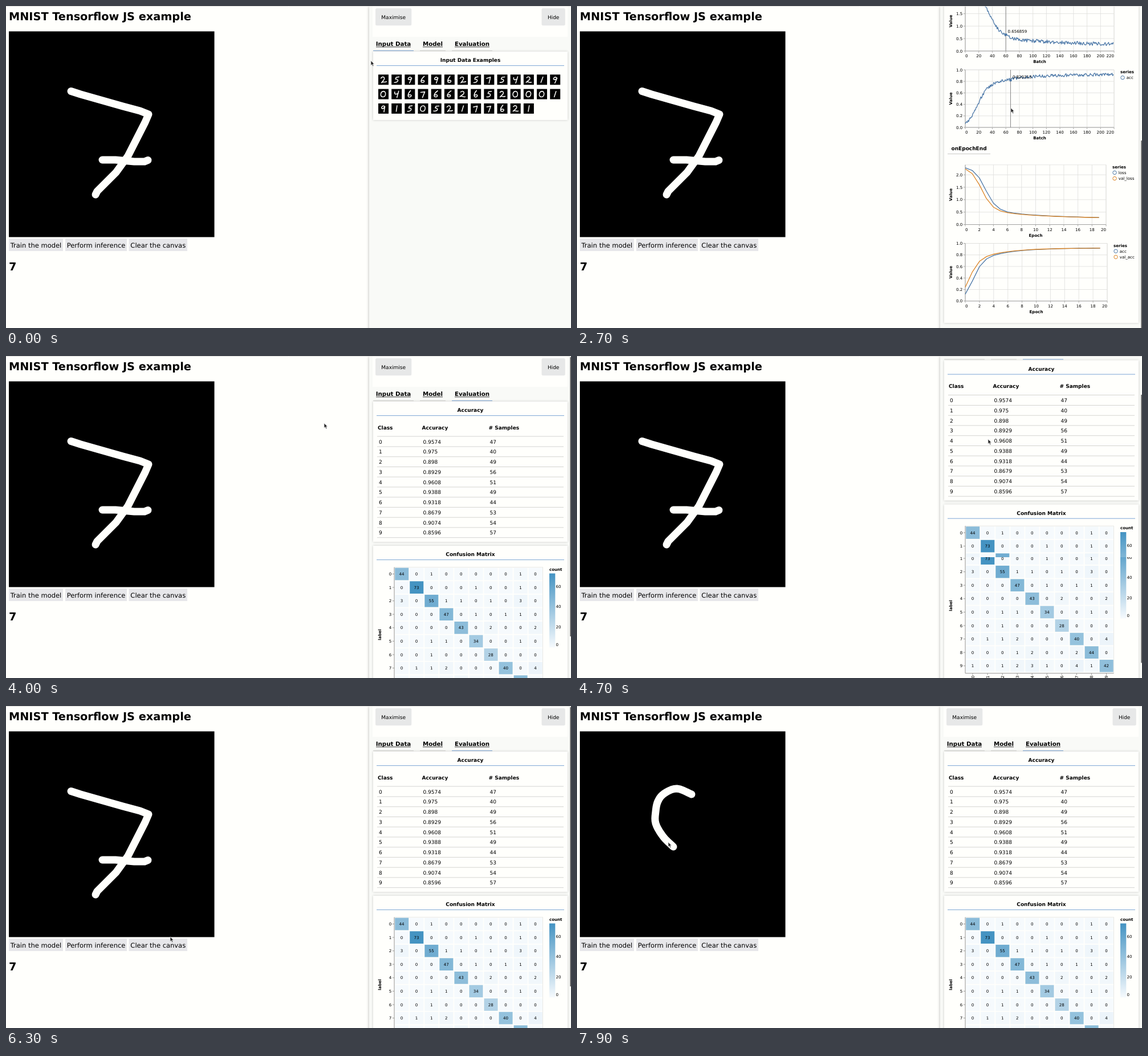
An HTML page with a canvas that plays this animation: 991 px wide and 565 px high, repeating every 8000 ms.

```html
<!DOCTYPE html>
<html lang="en">
<head>
<meta charset="utf-8">
<title>MNIST Tensorflow JS example</title>
<style>
html, body { margin: 0; width: 100%; height: 100%; overflow: hidden; background: #fffffc; }
canvas { display: block; }
</style>
</head>
<body>
<canvas id="stage" width="991" height="565"></canvas>
<script>
const ctx = document.getElementById('stage').getContext('2d');
const LOOP = 8000, STEP = 100;
const SANS = '"DejaVu Sans", sans-serif';
const PAPER = '#fffffc', INK = '#000', RULE = '#c9c9c7', GRID = '#dededc', AXIS = '#888';
const ACCENT = '#5b8fcb', LINK = '#4080c4', BLUE = '#4c78a8', ORANGE = '#dc8526';
const HEAD = 19.3, BUTTON = 11.5, TAB = 10.28, BODY = 9, SMALL = 7.07;

// ---- drawing helpers; text is placed by the middle of its capitals ----
function text(str, x, y, { size = BODY, bold = false, align = 'left', color = INK, turn = 0 } = {}) {
  ctx.save();
  ctx.translate(x, y);
  ctx.rotate(turn);
  ctx.font = `${bold ? 'bold ' : ''}${size}px ${SANS}`;
  ctx.textRendering = 'geometricPrecision';
  ctx.textAlign = align;
  ctx.fillStyle = color;
  ctx.fillText(str, 0, size * 0.365);
  ctx.restore();
}
const bold = (str, x, y, opts) => text(str, x, y, { bold: true, ...opts });
const small = (str, x, y, opts) => text(str, x, y, { size: SMALL, ...opts });
const axisTitle = (str, x, y, turn = 0) => small(str, x, y, { bold: true, align: 'center', turn });
const UP = -Math.PI / 2;

function rect(x, y, w, h, color) {
  ctx.fillStyle = color;
  ctx.fillRect(x, y, w, h);
}
function frame(x, y, w, h) {
  ctx.strokeStyle = GRID;
  ctx.lineWidth = 0.7;
  ctx.strokeRect(x, y, w, h);
}
function rounded(x, y, w, h, color) {
  ctx.beginPath();
  ctx.roundRect(x, y, w, h, 2.5);
  ctx.fillStyle = color;
  ctx.fill();
}
function disc(x, y, r) {
  ctx.beginPath();
  ctx.arc(x, y, r, 0, 2 * Math.PI);
}
function line(points, color, width = 1, ends = 'butt') {
  ctx.beginPath();
  points.forEach(([x, y]) => ctx.lineTo(x, y));
  ctx.strokeStyle = color;
  ctx.lineWidth = width;
  ctx.lineCap = ends;
  ctx.lineJoin = 'round';
  ctx.stroke();
}
const hline = (x1, x2, y, color = RULE, w = 0.8) => line([[x1, y], [x2, y]], color, w);
const vline = (x, y1, y2, color = RULE, w = 0.8) => line([[x, y1], [x, y2]], color, w);

function card(top, bottom, title) {
  ctx.save();
  ctx.shadowColor = 'rgba(0,0,0,.2)';
  ctx.shadowBlur = 4;
  rect(644, top, 341, bottom - top, PAPER);
  ctx.restore();
  bold(title, 814.5, top + 15, { align: 'center' });
  hline(650, 979, top + 24.6, ACCENT);
}

// ---- motion ----
const mix = (a, b, k) => a + (b - a) * k;
const sigmoid = v => 1 / (1 + Math.exp(-v));
const noise = n => { const v = Math.sin(n * 127.1 + 3.7) * 43758.5453; return (v - Math.floor(v)) * 2 - 1; };

function at(keys, t) {
  const n = keys.findIndex(k => k[0] > t);
  if (n < 0) return keys[keys.length - 1].slice(1);
  const a = keys[n - 1], b = keys[n], k = (t - a[0]) / (b[0] - a[0]);
  return a.slice(1).map((v, i) => mix(v, b[i + 1], k));
}
// smooth curve through the points, u counts points
function spline(points, u) {
  const i = Math.floor(u), k = u - i;
  const [a, b, c, d] = [-1, 0, 1, 2].map(o => points[Math.min(points.length - 1, Math.max(0, i + o))]);
  return [0, 1].map(j => b[j] + k / 2 * (c[j] - a[j]
    + k * (2 * a[j] - 5 * b[j] + 4 * c[j] - d[j] + k * (3 * (b[j] - c[j]) + d[j] - a[j]))));
}

const POINTER = [
  [0, 640, 96], [300, 640, 75], [400, 639, 95], [600, 638, 95], [1100, 757, 61], [1700, 757, 61],
  [2000, 752, 360], [2500, 760, 185], [2600, 761, 179], [3100, 761, 179], [3300, 822, 63],
  [3600, 822, 63], [4000, 558, 118], [4100, 552, 124], [4700, 721, 146], [5700, 721, 146],
  [6300, 288, 405], [6500, 264, 416], [6700, 264, 416], [7200, 192, 147]
];
const SCROLL = [
  [0, 0], [2000, 0], [2500, 374], [2700, 374], [2900, 0], [4300, 0], [4700, 72.5],
  [4900, 72.5], [5000, 86], [5400, 86], [5800, 0]
];
const CLEARED = 6700, PEN_DOWN = 7200;
const STROKE = [[201, 155], [175, 145], [153, 153.5], [142, 167], [138, 185], [138, 206], [151, 229], [169, 247]];
const penAt = t => spline(STROKE, Math.min(STROKE.length - 1, (t - PEN_DOWN) / STEP));

// ---- left page ----
const SEVEN = [
  [[114, 149.5], [131, 155], [205, 176], [235, 184], [250, 190], [244, 204], [214, 263],
   [193, 292], [160, 325], [157, 331]],
  [[169, 270], [192, 270], [225, 273], [243, 273], [249, 270.5]]
];
const ACTIONS = [['Train the model', 5, 95], ['Perform inference', 104, 108], ['Clear the canvas', 215.5, 102.5]];

function strokes(t) {
  if (t < CLEARED) return SEVEN;
  const drawn = [];
  for (let s = PEN_DOWN; s <= t; s += STEP / 5) drawn.push(penAt(s));
  return drawn.length === 1 ? [[drawn[0], drawn[0]]] : [drawn];
}
function page(t, x, y) {
  rect(0, 0, 991, 565, PAPER);
  bold('MNIST Tensorflow JS example', 5, 17.5, { size: HEAD });
  rect(5, 44.5, 360.5, 361, INK);
  strokes(t).forEach(s => line(s, PAPER, 13, 'round'));
  ACTIONS.forEach(([label, left, w]) => {
    const over = x > left && x < left + w && y > 408 && y < 430;
    rect(left, 408, w, 22, over ? '#d0d0d7' : '#e7e7ea');
    text(label, left + w / 2, 419.5, { size: BUTTON, align: 'center' });
  });
  bold('7', 5, 457, { size: HEAD });
}

// ---- input data tab ----
const GLYPHS = {
  0: 'M9 4C3 5 3 14 8 14C14 14 14 4 9 4', 1: 'M10 4L8 14',
  2: 'M5 6C8 2 13 5 10 9L5 14C8 11 10 15 14 13', 4: 'M6 5C5 9 7 10 12 8M13 4L9 15',
  5: 'M13 4L8 5L7 8C14 8 12 14 5 14', 6: 'M11 3C5 8 4 14 8 14C13 14 12 8 6 11',
  7: 'M5 6L12 5L8 15', 9: 'M12 6C8 2 4 8 7 9C9 9 11 8 12 6L9 15'
};
const SAMPLES = ['25969625754219', '04676626520001', '915052177621'];

function inputTab() {
  card(80, 200, 'Input Data Examples');
  SAMPLES.forEach((row, r) => [...row].forEach((digit, c) => {
    ctx.save();
    ctx.translate(653 + c * 23.17, 120.3 + r * 25.3);
    rect(0, 0, 18, 18, INK);
    ctx.translate(9, 9);
    ctx.rotate(noise(r * 14 + c) * 0.16);
    ctx.translate(-9, -9);
    ctx.strokeStyle = '#f4f4f2';
    ctx.lineWidth = 1.6;
    ctx.lineCap = ctx.lineJoin = 'round';
    ctx.stroke(new Path2D(GLYPHS[digit]));
    ctx.restore();
  }));
}

// ---- model tab ----
const LAYERS = [
  ['conv2d_Conv2D3', '[batch,24,24,8]', '208'], ['max_pooling2d_MaxPooling2D3', '[batch,12,12,8]', '0'],
  ['conv2d_Conv2D4', '[batch,8,8,8]', '1,608'], ['max_pooling2d_MaxPooling2D4', '[batch,4,4,8]', '0'],
  ['flatten_Flatten2', '[batch,128]', '0'], ['dense_Dense2', '[batch,10]', '1,290']
];

// training curves: a steep learning phase over a slow exponential tail
function lossAt(b) {
  const tail = 0.25 + 0.6 * Math.exp(-b / 75);
  return tail + (2.32 - tail) * sigmoid((36 - b) / 8.5);
}
const accAt = b => (0.92 - 0.36 * Math.exp(-b / 45)) * sigmoid((b - 16) / 7.5);

const perBatch = f => Array.from({ length: 220 }, (_, b) => f(b));
const perEpoch = (f, offset) => Array.from({ length: 20 }, (_, e) => f(e * 11 + offset));
const batchLoss = perBatch(b => lossAt(b) + noise(b) * Math.min(0.075, 0.005 + b * 0.0012));
const batchAcc = perBatch(b => accAt(b) + noise(b + 400) * 0.027);
batchLoss[60] = 0.656859;
batchAcc[60] = 0.814453;
batchAcc[67] = 0.820313;

function chart({ top, bottom, right, max, yStep, domain, xStep, xTitle, data, legendX, mark }) {
  const left = 681;
  const px = v => left + v / domain * (right - left);
  const py = v => bottom - v / max * (bottom - top);
  for (let v = 0; v <= domain; v += xStep) {
    vline(px(v), top, bottom, GRID);
    vline(px(v), bottom, bottom + 3, AXIS, 0.7);
    small(v, px(v), bottom + 8.5, { align: v === 0 ? 'left' : v === domain ? 'right' : 'center' });
  }
  for (let i = 0; i * yStep <= max + 0.01; i++) {
    const y = py(i * yStep);
    hline(left, right, y, GRID);
    hline(left - 3.2, left, y, AXIS, 0.7);
    small((i * yStep).toFixed(1), 676.3, y, { align: 'right' });
  }
  frame(left, top, right - left, bottom - top);
  vline(left, top, bottom, AXIS, 0.7);
  hline(left, right, bottom, AXIS, 0.7);
  axisTitle('Value', 655.5, (top + bottom) / 2, UP);
  axisTitle(xTitle, (left + right) / 2, bottom + 18.5);

  small('series', legendX, top + 3.5, { bold: true });
  Object.entries(data).forEach(([name, values], i) => {
    const color = i ? ORANGE : BLUE, y = top + 13.7 + i * 10.2;
    line(values.map((v, n) => [px(n), py(v)]), color, 1.3);
    disc(legendX + 4, y, 3.2);
    ctx.lineWidth = 1;
    ctx.stroke();
    small(name, legendX + 10.7, y);
  });
  if (mark) {
    const v = Object.values(data)[0][mark], x = px(mark), y = py(v);
    vline(x, top, bottom, AXIS, 1);
    disc(x, y, 2.3);
    ctx.fillStyle = BLUE;
    ctx.fill();
    small(v.toFixed(6), x + 3.4, y - 6);
  }
}

function modelTab(t) {
  card(80, 265, 'Model Architecture');
  bold('Layer Name', 652, 130.5);
  bold('Output', 801.5, 125);
  bold('Shape', 801.5, 136);
  bold('# Of', 878, 125);
  bold('Params', 878, 136);
  bold('Trainable', 928, 130.5);
  hline(651, 985, 152);
  LAYERS.forEach(([name, shape, params], i) => {
    const y = 161 + i * 17.74;
    text(name, 654, y);
    text(shape, 803.5, y);
    text(params, 880, y);
    text('true', 930, y);
    hline(651, 985, y + 8.9);
  });
  hline(645, 983, 264.7, '#666', 1.7);

  card(272.5, 930, 'Model Training');
  bold('onBatchEnd', 656.5, 319.5);
  hline(650, 723, 328.5, ACCENT);
  bold('onEpochEnd', 656.5, 624);
  hline(650, 725, 633.5, '#bbb');

  const loss = { max: 2.4, yStep: 0.5 }, acc = { max: 1, yStep: 0.2 };
  const batch = { right: 942, domain: 220, xStep: 20, xTitle: 'Batch', legendX: 953 };
  const epoch = { domain: 20, xStep: 2, xTitle: 'Epoch' };
  chart({ ...loss, ...batch, top: 348, bottom: 453, data: { loss: batchLoss }, mark: t >= 2100 ? 60 : 0 });
  chart({ ...acc, ...batch, top: 486, bottom: 587, data: { acc: batchAcc }, mark: t >= 2400 ? 67 : 60 });
  chart({ ...loss, ...epoch, top: 652.7, bottom: 757.5, right: 928, legendX: 939,
    data: { loss: perEpoch(lossAt, 5.5), val_loss: perEpoch(lossAt, 11.5) } });
  chart({ ...acc, ...epoch, top: 790.5, bottom: 891.7, right: 930, legendX: 941,
    data: { acc: perEpoch(accAt, 5.5), val_acc: perEpoch(accAt, 12) } });
}

// ---- evaluation tab ----
const ACCURACY = '0.9574 0.975 0.898 0.8929 0.9608 0.9388 0.9318 0.8679 0.9074 0.8596'.split(' ');
const COUNTS = '47 40 49 56 51 49 44 53 54 57'.split(' ');
const HITS = '44 73 55 47 43 34 28 40 44 42'.split(' ');
// wrong guesses per label, one digit per column
const MISSES = '0010000010 0000010010 3001101030 0000010110 0000002002 0011000010 0010000000 0112000004 0001200200 1012310410'
  .split(' ');
const PALE = [246, 250, 253], DEEP = [68, 147, 194];
const shade = k => `rgb(${PALE.map((v, i) => Math.round(mix(v, DEEP[i], k)))})`;

function evaluationTab() {
  card(80, 326, 'Accuracy');
  bold('Class', 652, 125.3);
  bold('Accuracy', 729.5, 125.3);
  bold('# Samples', 846.5, 125.3);
  hline(651, 978, 141);
  ACCURACY.forEach((acc, i) => {
    const y = 150.3 + i * 17.74;
    text(i, 654, y);
    text(acc, 731.5, y);
    text(COUNTS[i], 848.5, y);
    hline(651, 978, y + 8.7);
  });

  card(333, 646, 'Confusion Matrix');
  const left = 681, top = 370.7, w = 26.05, h = 23.58, bottom = 607.7;
  frame(left, top, w * 10, bottom - top);
  MISSES.forEach((row, r) => {
    const x = left + w * (r + 0.5), y = top + h * (r + 0.5);
    [...row].forEach((miss, c) => {
      const v = c === r ? HITS[r] : miss;
      rect(left + c * w + 1.2, y - 10.8, w - 2, h - 1.9, shade(v / 73));
      small(v, left + (c + 0.5) * w, y, { align: 'center' });
    });
    hline(left - 3.2, left, y, AXIS);
    small(r, 676.3, y, { align: 'right' });
    vline(x, bottom, bottom + 3.2, AXIS);
    small(r, x, 614, { align: 'center', turn: UP });
  });
  vline(left, top, bottom, AXIS);
  hline(left, left + w * 10, bottom, AXIS);
  axisTitle('label', 655.5, 489, UP);
  axisTitle('prediction', 811, 628);

  small('count', 953, 374, { bold: true });
  const ramp = ctx.createLinearGradient(0, 381.5, 0, 511.5);
  ramp.addColorStop(0, shade(1));
  ramp.addColorStop(1, shade(0));
  rect(953, 381.5, 10.3, 130, ramp);
  for (let v = 0; v <= 60; v += 20) small(v, 964.5, Math.min(506, 510.5 - v * 1.765));
}

// ---- side panel ----
const TABS = [['Input Data', 644, 715], ['Model', 726, 771], ['Evaluation', 782, 853]];
const overTab = (x, y, [, l, r]) => x > l && x < r && y > 58 && y < 74;

function headButton(label, x, w) {
  rounded(x, 4, w, 30.3, '#e7e8e8');
  text(label, x + w / 2, 19.3, { align: 'center' });
}
function scrollbar(t, active, scroll) {
  const [length, rate] = active === 1 ? [332, 0.626] : [490, 0.91];
  ctx.globalAlpha = Math.min(1, Math.max(0, (6900 - t) / 400));
  rect(989.3, 2 + scroll * rate, 1.7, length, '#666');
  ctx.globalAlpha = 1;
}
function panel(t, scroll, x, y) {
  const active = t < 1300 ? 0 : t < 3500 ? 1 : 2;
  ctx.save();
  ctx.shadowColor = 'rgba(0,0,0,.3)';
  ctx.shadowBlur = 5;
  rect(637, 1, 370, 580, '#f9faf7');
  ctx.restore();
  ctx.save();
  ctx.beginPath();
  ctx.rect(638, 1, 353, 564);
  ctx.clip();
  ctx.translate(0, -scroll);
  rect(643, 1, 342, 53, PAPER);
  headButton('Maximise', 648, 63.3);
  headButton('Hide', 939.5, 41.3);
  TABS.forEach((tab, i) => {
    const [name, l, r] = tab;
    const color = scroll === 0 && overTab(x, y, tab) ? LINK : INK;
    bold(name, (l + r) / 2, 66.7, { size: TAB, align: 'center', color });
    hline(l + 5, r - 5, 71.8, color);
    hline(l, r, 78.4, i === active ? ACCENT : RULE);
  });
  [inputTab, modelTab, evaluationTab][active](t);
  ctx.restore();
  if (active) scrollbar(t, active, scroll);
}

const ARROW = new Path2D('M0 0L0 8.2L1.9 6.5L3.4 9.6L4.8 9L3.4 5.9L5.8 5.7Z');
const HAND = new Path2D('M-3 1Q-2 -.5 -1 1L0 4L4 4Q5.5 4 5 6L4 9L-1 9L-4 5.5Q-4 4 -2 5Z');
function pointer(x, y, hand) {
  ctx.save();
  ctx.translate(x, y);
  ctx.fillStyle = hand ? '#fff' : '#222';
  ctx.strokeStyle = hand ? '#222' : '#ddd';
  ctx.lineWidth = 0.8;
  ctx.fill(hand ? HAND : ARROW);
  ctx.stroke(hand ? HAND : ARROW);
  ctx.restore();
}

function draw(t) {
  const [penX, penY] = t < PEN_DOWN ? [0, 0] : penAt(t);
  const [x, y] = t < PEN_DOWN ? at(POINTER, t) : [penX - 9, penY - 8];
  const [scroll] = at(SCROLL, t);
  page(t, x, y);
  panel(t, scroll, x, y);
  if (t >= 4700 && t < 5000) {
    // the lower part of the screen lags behind the scroll
    ctx.save();
    ctx.beginPath();
    ctx.rect(638, 353, 353, 212);
    ctx.clip();
    panel(t, 51, x, y);
    ctx.restore();
  }
  hline(0, 991, 0.5, '#dcdcda', 1);
  pointer(x, y, scroll === 0 && TABS.some(tab => overTab(x, y, tab)));
}

function tick() {
  const t = performance.now() % LOOP;
  draw(Math.floor(t / STEP) * STEP);
  requestAnimationFrame(tick);
}
tick();
</script>
</body>
</html>
```
